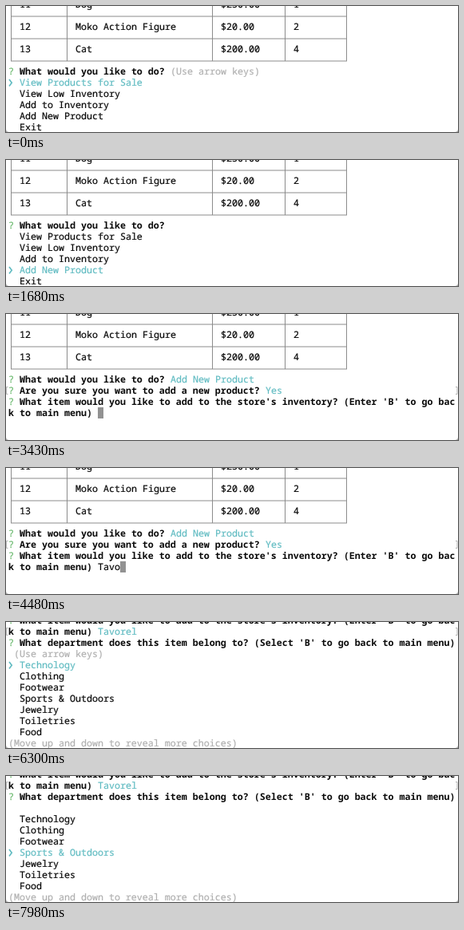
Recreate the animation shown at these times as an HTML page. Size 566 px wide and 158 px high, loop 8 s.

```html
<!DOCTYPE html>
<html lang="en">
<head>
<meta charset="utf-8">
<title>Store manager terminal</title>
<style>
  html, body { margin: 0; width: 100%; height: 100%; overflow: hidden; background: #a6a6a6; }
  svg { display: block; width: 566px; height: 158px; background: #fff; border-radius: 0 0 4px 4px; color: #0a0a0a; }
  text {
    font: 11.667px "Noto Sans Mono", "DejaVu Sans Mono", monospace;
    text-rendering: geometricPrecision;
    white-space: pre;
    fill: currentColor;
    stroke: currentColor;
    stroke-width: .22px;
  }
  .bold { font-weight: 700; stroke: none; }
  .dim { color: #b0b0b0; }
  .cyan { color: #62bcc2; }
  .green { color: #6cba70; }
  .grid { fill: #8c8c8c; }
  .cursor { fill: #929292; }
  .arrow { fill: none; stroke: #62bcc2; stroke-width: 1.7; }
  .mark { fill: none; stroke: #b5b5b5; }
</style>
</head>
<body>
<svg id="stage" viewBox="0 0 566 158"></svg>
<script>
const NS = 'http://www.w3.org/2000/svg';
const LOOP = 8000, CW = 7, LH = 14;
const stage = document.getElementById('stage');
const colX = c => 3 + c * CW;
const rowY = r => 5 + r * LH;

function add(parent, tag, attrs, content) {
  const el = document.createElementNS(NS, tag);
  for (const k in attrs) el.setAttribute(k, attrs[k]);
  if (content) el.textContent = content;
  parent.appendChild(el);
  return el;
}

const put = (g, row, col, str, cls = '') =>
  add(g, 'text', { x: colX(col), y: rowY(row) + 11, class: cls }, str);
const rect = (g, x, y, width, height, cls) =>
  add(g, 'rect', { x, y, width, height, class: cls });
const cursor = (g, row, col) => rect(g, colX(col), rowY(row), CW, LH, 'cursor');

function marks(g, row) {
  const y = rowY(row) + 2.5;
  add(g, 'path', { class: 'mark', d: `M2.5 ${y}H.5v9h2M563 ${y}h2v9h-2` });
}

function ask(g, row, question, answer, cls = 'cyan') {
  put(g, row, 0, '?', 'green');
  put(g, row, 2, question, 'bold');
  if (answer) put(g, row, question.length + 3, answer, cls);
}

function list(g, row, items, chosen) {
  items.forEach((item, i) => put(g, row + i, 2, item, i === chosen ? 'cyan' : ''));
  add(g, 'path', { class: 'arrow', d: `M4 ${rowY(row + chosen) + 3}l3.2 4.2l-3.2 4.2` });
}

function table(g) {
  const rows = [
    ['11', 'Dog', '$250.00', '1'],
    ['12', 'Moko Action Figure', '$20.00', '2'],
    ['13', 'Cat', '$200.00', '4']
  ];
  rows.forEach((cells, i) =>
    cells.forEach((cell, j) => put(g, i * 2 - 1, [2, 12, 38, 51][j], cell)));
  for (const c of [0, 10, 36, 49, 60]) rect(g, colX(c) + 3, 0, 1, 69, 'grid');
  for (const r of [0, 2, 4]) rect(g, 6, rowY(r) + 7.5, 421, 1, 'grid');
}

const MENU = ['View Products for Sale', 'View Low Inventory', 'Add to Inventory', 'Add New Product', 'Exit'];
const DEPTS = ['Technology', 'Clothing', 'Footwear', 'Sports & Outdoors', 'Jewelry', 'Toiletries', 'Food'];
const TASK = 'What would you like to do?';
const SURE = 'Are you sure you want to add a new product?';
const ITEM = "What item would you like to add to the store's inventory? (Enter 'B' to go bac";
const ITEM_END = 'k to main menu)';
const DEPT = "What department does this item belong to? (Select 'B' to go back to main menu)";
const NAME = 'Tavorel';
const HINT = '(Use arrow keys)';

const menu = chosen => g => {
  table(g);
  ask(g, 5, TASK, chosen ? '' : HINT, 'dim');
  list(g, 6, MENU, chosen);
};

function taskDone(g) {
  table(g);
  ask(g, 5, TASK, MENU[3]);
}

const confirmAdd = typed => g => {
  taskDone(g);
  ask(g, 6, SURE, '(Y/n)', 'dim');
  put(g, 6, 52, typed);
  cursor(g, 6, 52 + typed.length);
};

function sureDone(g) {
  taskDone(g);
  ask(g, 6, SURE, 'Yes');
  marks(g, 6);
}

const typeName = (n, done) => g => {
  sureDone(g);
  ask(g, 7, ITEM);
  put(g, 8, 0, ITEM_END, 'bold');
  put(g, 8, 16, NAME.slice(0, n), done ? 'cyan' : '');
  if (done) marks(g, 8);
  cursor(g, done ? 9 : 8, done ? 0 : 16 + n);
};

const pickDept = chosen => g => {
  ask(g, -1, ITEM);
  put(g, 0, 0, ITEM_END, 'bold');
  put(g, 0, 16, NAME, 'cyan');
  marks(g, 0);
  ask(g, 1, DEPT);
  if (!chosen) put(g, 2, 1, HINT, 'dim');
  list(g, 3, DEPTS, chosen);
  put(g, 10, 0, '(Move up and down to reveal more choices)', 'dim');
};

const steps = [
  [0, menu(0)],
  [1330, menu(1)],
  [1540, menu(2)],
  [1680, menu(3)],
  [2100, g => { taskDone(g); cursor(g, 6, 0); }],
  [2170, confirmAdd('')],
  [3150, confirmAdd('y')],
  [3360, g => { sureDone(g); cursor(g, 7, 0); }],
  [3430, typeName(0)],
  [3920, typeName(1)],
  [4200, typeName(2)],
  [4410, typeName(3)],
  [4480, typeName(4)],
  [4690, typeName(6)],
  [4760, typeName(7)],
  [5390, typeName(7, true)],
  [5460, pickDept(0)],
  [7630, pickDept(1)],
  [7770, pickDept(2)],
  [7910, pickDept(3)]
];

const screens = steps.map(([start, draw]) => {
  const g = add(stage, 'g', { display: 'none' });
  draw(g);
  return { start, g };
});

let shown = null;
function tick() {
  const t = performance.now() % LOOP;
  const next = screens.findLast(s => s.start <= t);
  if (next !== shown) {
    if (shown) shown.g.setAttribute('display', 'none');
    next.g.removeAttribute('display');
    shown = next;
  }
  requestAnimationFrame(tick);
}
tick();
</script>
</body>
</html>
```
